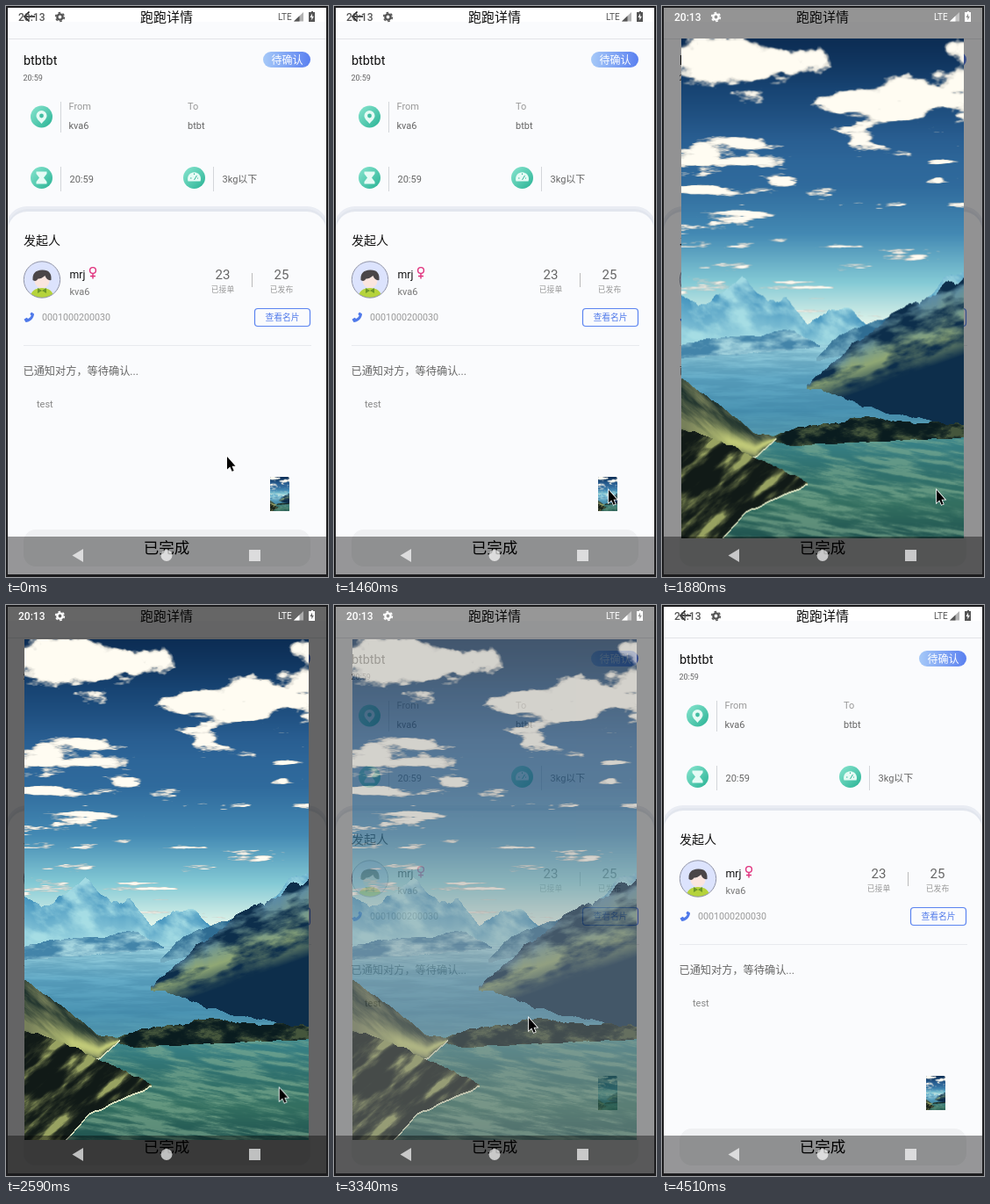
These frames come from a looping animation (367x650 px, 4910 ms). An HTML page with a canvas:

```html
<!DOCTYPE html>
<html lang="zh">
<head>
<meta charset="utf-8">
<title>Order details</title>
<style>
html, body { margin: 0; width: 367px; height: 650px; overflow: hidden; background: #fafbfd; }
body { position: relative; }
svg, canvas, div { position: absolute; left: 0; top: 0; display: block; }
text { font-family: Roboto, "Noto Sans CJK SC", "Noto Sans CJK", sans-serif; font-size: 11px; fill: #666; }
.mid { text-anchor: middle; }
.pale { fill: #999; }
.ink { fill: #111; }
.blue { fill: #4f79ea; }
.rule { stroke: #d3d6da; }
.s9 { font-size: 8.8px; }
.s15 { font-size: 15px; }

#dim { width: 367px; height: 650px; background: #000; }
#photo { left: 21px; top: 39px; }
#thumb { left: 301px; top: 536px; }
#frame { width: 363px; height: 645px; border: solid #1c1c1e; border-width: 2px 2px 3px; }

#dim { animation: dim 4910ms linear infinite; }
#photo { animation: photo 4910ms linear infinite; }
#cursor { animation: cursor 4910ms linear infinite; }
.bar { animation: bar 4910ms linear infinite; }
.tap { animation: tap 4910ms linear infinite; }
#darkBar { --rest: 1; --open: 0; }
#lightBar { --rest: 0; --open: 1; }
#closeTap { animation-delay: -3180ms; }

@keyframes dim {
  0%, 35.56% { opacity: 0; }
  39.51%, 66.6% { opacity: .6; }
  71.08%, 100% { opacity: 0; }
}
@keyframes photo {
  0%, 34.7% { opacity: 0; transform: translateY(-8px) scale(.9); }
  36.4% { opacity: 1; transform: translateY(-6.5px) scale(.981, .991); }
  39.51%, 66% { opacity: 1; transform: none; }
  71.08%, 100% { opacity: 0; }
}
@keyframes bar {
  0%, 37.6% { opacity: var(--rest); }
  37.61%, 69% { opacity: var(--open); }
  69.01%, 100% { opacity: var(--rest); }
}
@keyframes tap {
  0%, 28.5% { opacity: 0; }
  28.51%, 29.72% { opacity: .47; }
  29.73%, 100% { opacity: 0; }
}
@keyframes cursor {
  0%, 12.1% { transform: translate(251px, 512px); animation-timing-function: cubic-bezier(.4, 0, .4, 1); }
  22.6%, 23.5% { transform: translate(310px, 549px); }
  24.2%, 52.4% { transform: translate(312px, 550px); animation-timing-function: cubic-bezier(.35, .1, .4, 1); }
  62.5%, 83.6% { transform: translate(221px, 469px); animation-timing-function: ease-in; }
  88% { transform: translate(238px, 540px); }
  91.8% { transform: translate(311px, 650px); opacity: 1; }
  91.85%, 100% { transform: translate(311px, 650px); opacity: 0; }
}
</style>
</head>
<body>
<svg width="367" height="650">
  <defs>
    <linearGradient id="badge"><stop stop-color="#a6c9f8"/><stop offset="1" stop-color="#5a80f0"/></linearGradient>
    <linearGradient id="mint" x2="1" y2="1"><stop stop-color="#8ae6d0"/><stop offset="1" stop-color="#28b294"/></linearGradient>
    <clipPath id="face"><circle cx="41" cy="311.5" r="20.5"/></clipPath>
    <circle id="disc" r="12.5" fill="url(#mint)"/>
    <g id="status">
      <text x="14" y="17" style="font-size:12px;font-weight:500;fill:inherit">20:13</text>
      <g fill="none" stroke="currentColor">
        <circle cx="61.5" cy="12.5" r="3.1" stroke-width="2.4"/>
        <circle cx="61.5" cy="12.5" r="4.9" stroke-width="1.6" stroke-dasharray="2.6 2.53"/>
      </g>
      <text x="310" y="16" style="font-size:10px;fill:inherit">LTE</text>
      <path d="M328 17.5L339 7V17.5Z" opacity=".45"/>
      <path d="M328 17.5L334.5 11.3V17.5Z"/>
      <path fill-rule="evenodd" d="M347 7h1V6h2v1h2v11h-7V7ZM349 8.5l-2.5 4.5h1.8v3.3l2.6-4.6H349Z"/>
    </g>
  </defs>

  <rect width="367" height="650" fill="#fafbfd"/>
  <rect width="367" height="18" fill="#fff"/>
  <path d="M0 37.5H367" stroke="#e2e4e8"/>
  <text x="183" y="17.5" class="mid ink s15">跑跑详情</text>
  <g id="darkBar" class="bar" fill="#555" color="#555">
    <path d="M33 12H21M26.5 6.5L21 12L26.5 17.5" fill="none" stroke="#111" stroke-width="1.7"/>
    <use href="#status"/>
  </g>

  <text x="20" y="67" class="ink" style="font-size:14.4px">btbtbt</text>
  <text x="19.5" y="84.5" style="font-size:9px">20:59</text>
  <rect x="293" y="52" width="54" height="18" rx="9" fill="url(#badge)"/>
  <text x="320.5" y="65.5" class="mid" style="font-size:12px;fill:#fff">待确认</text>

  <use href="#disc" x="40.5" y="126"/><use href="#disc" x="40.5" y="195.5"/><use href="#disc" x="214.5" y="195.5"/>
  <g fill="#e6fbf5">
    <path d="M40.5 134c-3.5-4-6-6-6-9a6 6 0 0 1 12 0c0 3-2.5 5-6 9Z"/>
    <path d="M34.5 188.5h12v2.500l-3.500 4.500 3.500 4.500v2.500h-12V200l3.500-4.500-3.500-4.500Z"/>
    <path d="M207.5 199.5a7.500 7.500 0 1 1 14 0Z"/>
  </g>
  <circle cx="40.5" cy="125" r="2.4" fill="#42bda2"/>
  <path d="M214.5 198l3-5M210 196h1.500M214.5 190.500v1.500M219 196h-1" stroke="#34b598"/>
  <path class="rule" d="M62.5 109V144M62.5 183V211M236.5 183V211"/>
  <text x="71.5" y="118" class="pale">From</text><text x="71.5" y="140">kva6</text>
  <text x="207" y="118" class="pale">To</text><text x="207" y="140">btbt</text>
  <text x="72.5" y="201">20:59</text><text x="246.5" y="201">3kg以下</text>

  <rect y="228" width="367" height="100" rx="24" fill="#e9ecf3"/>
  <rect x="1" y="231" width="365" height="100" rx="24" fill="#e2e6ee"/>
  <rect x="2" y="234" width="363" height="440" rx="22" fill="#fafbfd"/>
  <text x="20" y="272" class="ink" style="font-size:14px">发起人</text>

  <g clip-path="url(#face)">
    <circle cx="41" cy="311.5" r="21" fill="#dce3fd"/>
    <path d="M27 334q1-13 14-13t14 13Z" fill="#b5d33c"/>
    <ellipse cx="41" cy="313" rx="8.500" ry="8" fill="#fae5df"/>
    <path d="M30.5 312q-1-11 10.500-11.500t10.500 11.500q-5 1-7-5-5 4-8 3.500-2 4-6 1.500Z" fill="#4a4648"/>
    <path d="M36 321v6l10-6v6Z" fill="#6d962a"/>
  </g>
  <circle cx="41" cy="311.5" r="20.7" fill="none" stroke="#8f93a8"/>
  <text x="72.5" y="310" class="ink" style="font-size:12.3px">mrj</text>
  <g fill="none" stroke="#e0307c" stroke-width="1.4">
    <path d="M99 304.5V310.5M96 307.5h6"/><circle cx="99" cy="301" r="3.4"/>
  </g>
  <text x="72.5" y="329" style="fill:#777">kva6</text>
  <g class="mid">
    <text x="247" y="311" class="s15">23</text><text x="314" y="311" class="s15">25</text>
    <text x="247" y="325.5" class="pale s9">已接单</text><text x="314" y="325.5" class="pale s9">已发布</text>
  </g>
  <path d="M280.5 304V320" stroke="#bbb"/>
  <path d="M29 348.5l3 2c0 5-5 9.500-9.500 9.500l-2-3.300 3-2 1.700 1.300q2.500-1.300 3.500-3.500l-1.300-1.800Z" class="blue"/>
  <text x="41" y="358" class="pale" style="font-size:10.7px">0001000200030</text>
  <rect x="283.5" y="344.5" width="63" height="20" rx="3.5" fill="none" stroke="#5b84f0" stroke-width="1.2"/>
  <text x="315" y="358" class="mid blue" style="font-size:9.8px">查看名片</text>
  <path d="M20 386.5H348" stroke="#e8eaee"/>
  <text x="19.5" y="419.5" style="font-size:12.2px">已通知对方，等待确认...</text>
  <text x="35" y="457" style="fill:#888">test</text>

  <rect x="20" y="596" width="327" height="42" rx="14" fill="#eff0f2"/>
  <text x="183" y="623" class="mid" style="font-size:17.5px;fill:#000">已完成</text>
</svg>
<canvas id="thumb" width="22" height="39"></canvas>
<div id="dim"></div>
<canvas id="photo" width="324" height="570"></canvas>

<svg width="367" height="650">
  <g id="lightBar" class="bar" fill="#fff" color="#fff"><use href="#status"/></g>
  <rect y="604" width="367" height="46" opacity=".4"/>
  <g fill="#fff" opacity=".68">
    <path d="M75.5 625.5L88 618V633Z"/><circle cx="183" cy="625.5" r="6.5"/><rect x="277" y="619" width="13" height="13"/>
  </g>
</svg>
<div id="frame"></div>
<svg width="367" height="650">
  <circle class="tap" cx="314.5" cy="551.5" r="10.5" fill="#ff0"/>
  <circle class="tap" id="closeTap" cx="223.5" cy="471.5" r="10.5" fill="#ff0"/>
  <path id="cursor" d="M1 1V15.500L4.300 12.400L6.600 17.800L8.700 16.900L6.500 11.700H10.500Z" stroke="#fff" stroke-width="1.6" paint-order="stroke"/>
</svg>

<script>
// The landscape is computed in stage coordinates; its box is given here.
const LEFT = 21, TOP = 39, W = 324, H = 570;
const photo = document.getElementById('photo');
const g = photo.getContext('2d');
const img = g.createImageData(W, H);

const clamp = v => Math.min(1, Math.max(0, v));
const mix = (a, b, t) => a + (b - a) * t;
const rgb = c => Array.isArray(c) ? c : [c >> 16, c >> 8 & 255, c & 255];
function blend(a, b, t) {
  const p = rgb(a), q = rgb(b);
  return p.map((v, i) => mix(v, q[i], t));
}
function ramp(t, ...colors) {
  const p = clamp(t) * (colors.length - 1), i = Math.min(Math.floor(p), colors.length - 2);
  return blend(colors[i], colors[i + 1], p - i);
}

function hash(x, y) {
  let h = Math.imul(x, 374761393) + Math.imul(y, 668265263);
  h = Math.imul(h ^ h >>> 13, 1274126177);
  return ((h ^ h >>> 16) >>> 0) / 2 ** 32;
}
function noise(x, y) {
  const i = Math.floor(x), j = Math.floor(y);
  const [u, v] = [x - i, y - j].map(f => f * f * (3 - 2 * f));
  return mix(mix(hash(i, j), hash(i + 1, j), u), mix(hash(i, j + 1), hash(i + 1, j + 1), u), v);
}
function fbm(x, y) {
  let sum = 0;
  for (let k = 1; k <= 5; k++) sum += noise(x * 2 ** k, y * 2 ** k) / 2 ** k;
  return sum - .48;
}
const tex = (x, y, sx, sy) => clamp(.5 + 3 * fbm(x / sx / 2, y / sy / 2));

// Height at x of a line through a few x, y pairs.
function at(line, x) {
  let i = 2;
  while (i < line.length - 2 && line[i] < x) i += 2;
  return mix(line[i - 1], line[i + 1], (x - line[i - 2]) / (line[i] - line[i - 2]));
}
const flat = y => [LEFT, y, LEFT + W, y];

// Fills between two lines; color gets x, y, depth 0..1 and distance to the lower line.
function layer(top, bottom, rough, color) {
  for (let x = top[0]; x < Math.min(top.at(-2), LEFT + W); x++) {
    const y0 = at(top, x) + fbm(x / 24, top[1]) * rough;
    const y1 = at(bottom, x) + fbm(x / 24, bottom[1]) * rough / 2;
    for (let y = Math.round(y0); y < Math.min(y1, TOP + H); y++) {
      img.data.set([...color(x, y, (y - y0) / (y1 - y0), y1 - y), 255], ((y - TOP) * W + x - LEFT) * 4);
    }
  }
}

// Cloud centres with their radii.
const puffs = [[80, 62, 75, 36], [300, 108, 75, 30], [110, 165, 85, 25], [215, 112, 55, 24], [332, 48, 25, 12],
  [60, 214, 60, 9], [188, 212, 32, 7], [125, 240, 85, 6], [330, 228, 28, 5]];
function sky(x, y, t) {
  const blue = ramp(t, 0x0a2a4e, 0x1b4c7d, 0x2b6296, 0x2f6a9c, 0x4389b3, 0x84cad5, 0xf2fcee);
  const puff = puffs.reduce((s, [cx, cy, rx, ry]) => s + Math.exp(-(((x - cx) / rx) ** 2) - ((y - cy) / ry) ** 2), 0);
  const d = puff - .55 + 3 * fbm(x / 90, y * y / 8000);
  return blend(blend(blue, 0x0e305a, clamp(.5 - t * 1.2)), blend(0xb9b9b4, 0xfffcf2, clamp(d * 3)), clamp(d * 5));
}
const haze = (x, y, t) => blend(blend(0x4796bf, 0xa2dae3, tex(x - y / 2, y, 22, 18)), 0xa8dfe5, clamp(t));
const shore = (color, left) => left < 2 ? [216, 224, 190] : color;

layer(flat(TOP), flat(372), 0, sky);
layer([21, 332, 40, 345, 58, 336, 90, 311, 120, 338, 140, 335, 175, 378], flat(395), 12, haze);
layer([163, 366, 185, 352, 210, 347, 235, 366, 290, 350, 325, 311, 345, 305], flat(395), 10, haze);
layer(flat(388), flat(502), 0, (x, y, t) =>
  blend(ramp(t, 0xa3d8e3, 0x64abc7, 0x4a93b2, 0x62a5b2), 0x3a7d9f, tex(x, y, 40, 4) * .35));
layer([21, 388, 60, 381, 105, 378, 145, 371, 180, 391], [21, 404, 80, 399, 180, 391], 6, (x, y) =>
  blend(0x4384a9, 0xa4d4de, tex(x, y, 24, 9)));
layer([176, 402, 200, 378, 240, 362, 275, 352], [176, 406, 215, 398, 275, 372], 6, (x, y) =>
  blend(0x2f6c92, 0x72aabf, tex(x, y, 18, 12)));

// Right mountain: lit above a falling shadow line, navy below it
layer([165, 433, 205, 398, 258, 356, 300, 337, 325, 319, 345, 312], [165, 437, 215, 452, 260, 466, 345, 482], 14, (x, y, t) => {
  const lit = clamp((440 - .35 * (x - 230) - y) / 28) * tex(x + y, y, 26, 14);
  return blend(0x0d2e4b, blend(0x5a8aa5, 0x8fa775, clamp(t * 2.5)), lit);
});
layer(flat(492), flat(TOP + H), 0, (x, y, t) =>
  blend(ramp(t, 0x3a858c, 0x2f706e, 0x336f60, 0x1f5350), 0x8ab596, tex(x, y - x / 6, 34, 5) ** 2 * .55));
layer([120, 494, 140, 487, 185, 479, 232, 469, 262, 475, 345, 479], [120, 498, 150, 503, 345, 494], 8, (x, y) =>
  blend(0x0a1c1f, 0x45563c, tex(x, y, 16, 8) ** 2));

// Left bank: a hill with a sunlit meadow, then a dark foreground
layer([21, 428, 60, 455, 105, 488, 130, 493], [21, 520, 105, 518, 130, 496], 6, (x, y, t, left) => {
  const sun = Math.exp(-(((t - .6) * 4) ** 2)) * clamp((x - 25) / 50);
  return shore(blend(blend(0x22352f, 0x77805a, tex(x - y, y, 14, 30)), 0xc0c978, sun), left);
});
layer([21, 485, 50, 492, 75, 502, 105, 516, 135, 530, 166, 546], [21, 640, 68, 609, 95, 580, 166, 548], 8, (x, y, t, left) =>
  shore(blend(0x111a17, 0x98a261, tex(x + y, y, 18, 26) ** 2), left));

g.putImageData(img, 0, 0);
const small = document.getElementById('thumb').getContext('2d');
small.imageSmoothingQuality = 'high';
small.drawImage(photo, 0, 0, 22, 39);
</script>
</body>
</html>
```
